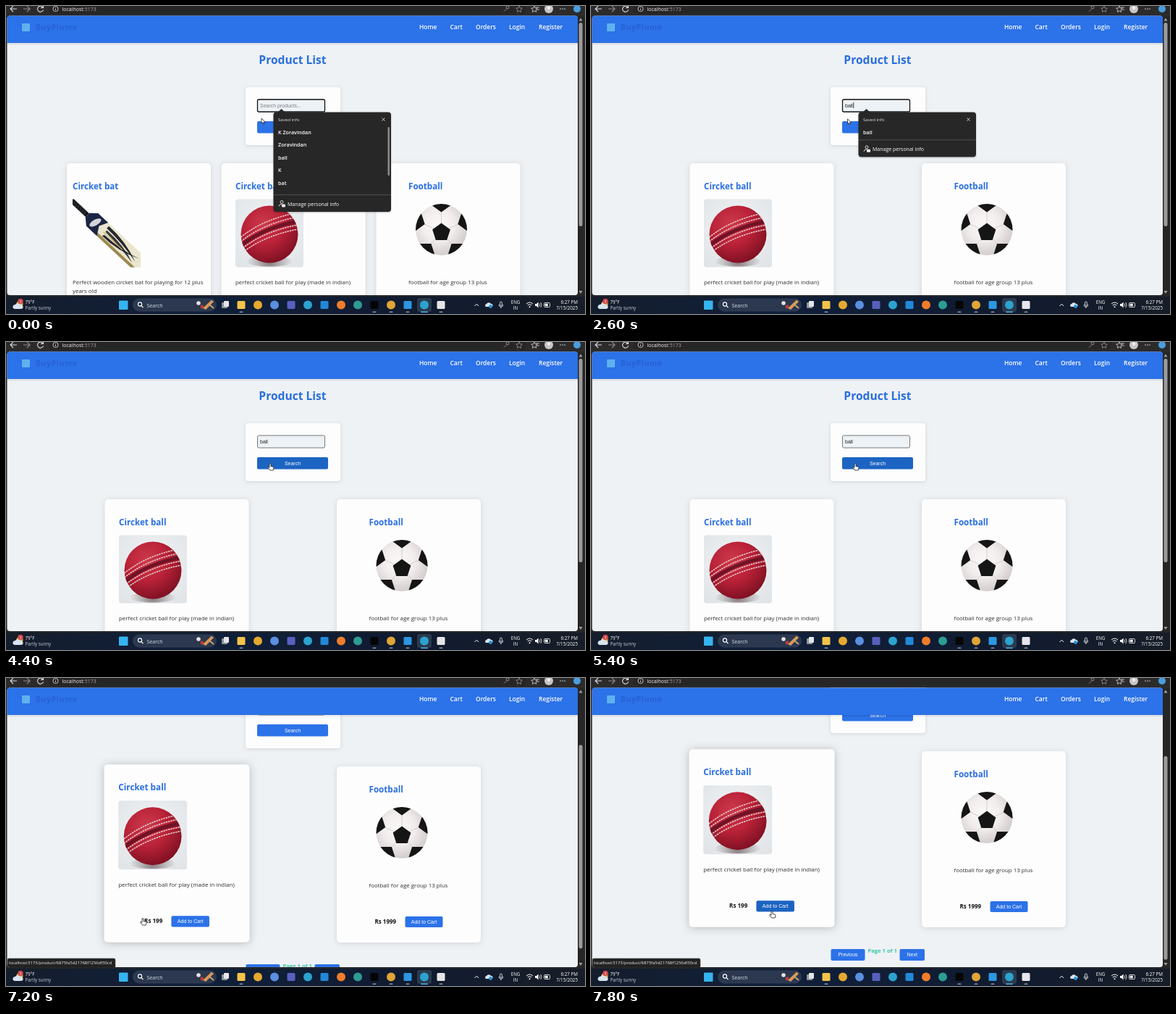
Animation of 800 by 425 pixels, one loop 8 s. Source, as an HTML page with a canvas:

```html
<!DOCTYPE html>
<html lang="en">
<head>
<meta charset="utf-8">
<title>Product search</title>
<style>
  html, body { margin: 0; width: 100%; height: 100%; overflow: hidden; background: #262626; }
  canvas { display: block; width: 100vw; height: 100vh; }
</style>
</head>
<body>
<canvas id="stage" width="800" height="425"></canvas>
<script>
const ctx = document.getElementById('stage').getContext('2d');
const LOOP = 8000, STEP = 200;
const BLUE = '#2c72e8', DARK_BLUE = '#1c64c2', INK = '#262626';
const UI = '"Open Sans", "Noto Sans", sans-serif';
const FORM = '"Liberation Sans", sans-serif';

// ---- drawing helpers ----
function text(str, x, y, size, color, { weight = 400, font = UI, align = 'left', spacing = 0 } = {}) {
  ctx.font = `${weight} ${size}px ${font}`;
  ctx.textAlign = align;
  ctx.letterSpacing = spacing + 'px';
  ctx.fillStyle = color;
  ctx.fillText(str, x, y);
}
function box(x, y, w, h, r, fill, stroke, line = 1) {
  ctx.beginPath();
  ctx.roundRect(x, y, w, h, r);
  if (fill) { ctx.fillStyle = fill; ctx.fill(); }
  if (stroke) { ctx.strokeStyle = stroke; ctx.lineWidth = line; ctx.stroke(); }
}
function circle(x, y, r, fill, stroke, line = 1) {
  box(x - r, y - r, 2 * r, 2 * r, r, fill, stroke, line);
}
function ellipse(x, y, rx, ry, turn, fill) {
  ctx.beginPath();
  ctx.ellipse(x, y, rx, ry, turn, 0, 2 * Math.PI);
  ctx.fillStyle = fill;
  ctx.fill();
}
function path(d, fill, stroke, line = 1) {
  const p = new Path2D(d);
  if (fill) { ctx.fillStyle = fill; ctx.fill(p); }
  if (stroke) { ctx.strokeStyle = stroke; ctx.lineWidth = line; ctx.stroke(p); }
}
function at(x, y, draw) {
  ctx.save();
  ctx.translate(x, y);
  draw();
  ctx.restore();
}
function shadowed(blur, color, draw) {
  ctx.save();
  ctx.shadowBlur = blur;
  ctx.shadowColor = color;
  ctx.shadowOffsetY = 1;
  draw();
  ctx.restore();
}
function radial(x, y, r, ...colors) {
  const g = ctx.createRadialGradient(x, y, 0, x, y, r);
  colors.forEach((c, i) => g.addColorStop(i / (colors.length - 1), c));
  return g;
}
function button(label, x, y, w, h, hot) {
  box(x, y, w, h, 2, hot ? DARK_BLUE : BLUE);
  text(label, x + w / 2, y + h / 2 + 2.4, 7, '#fff', { font: FORM, align: 'center' });
}

// ---- timeline ----
function track(t, keys) {
  let [t0, v0] = keys[0];
  for (const [t1, v1] of keys) {
    if (t < t1) return t <= t0 ? v0 : v0 + (v1 - v0) * (t - t0) / (t1 - t0);
    [t0, v0] = [t1, v1];
  }
  return v0;
}
const inside = (p, x, y, w, h) => p.x > x && p.x < x + w && p.y > y && p.y < y + h;

function stateAt(t) {
  const s = {
    typed: 'ball'.slice(0, [800, 1200, 1600, 2000].filter(k => t >= k).length),
    filtered: t >= 2000,
    focused: t < 4000,
    scroll: track(t, [[6600, 0], [6800, 20], [7200, 95], [7400, 110], [7600, 116]]),
    status: t >= 6600,
    mouse: {
      x: track(t, [[0, 353], [3400, 355], [4000, 365], [5400, 365], [6200, 189], [7400, 189], [7800, 250]]),
      y: track(t, [[0, 155], [3400, 156], [4000, 168], [5400, 168], [6200, 332], [7400, 332], [7800, 322]]),
    },
  };
  s.onSearch = inside(s.mouse, 347, 159 - s.scroll, 98, 16) && !s.focused;
  s.onCard = s.filtered && inside(s.mouse, 136, 217 - s.scroll, 200, 243);
  s.onAdd = s.onCard && inside(s.mouse, 228, 424 - s.scroll, 52, 15);
  return s;
}

// ---- product pictures, each 94 by 94 ----
function drawBat() {
  ctx.beginPath();
  ctx.rect(0, 0, 94, 94);
  ctx.clip();
  ctx.translate(0, 3);
  ctx.rotate(0.75);
  box(-8, -3.5, 40, 7, 2, '#17181d');
  for (let x = 2; x < 26; x += 4) path(`M${x} -3 l2 6`, null, '#4a4b52', 0.7);
  path('M28 -4 L37 -12 H122 Q131 -9 131 0 Q131 9 124 12 H37 L28 4Z', '#eae5cd');
  path('M50 8 H128 L124 12 H46Z', '#9c8850');
  path('M28 -4 L37 -12 H56 L50 0 L57 12 H37 L28 4Z', '#1d2544');
  ellipse(43, 0, 4, 9, 0.3, '#d3d5da');
  path('M60 -9 Q90 -10 120 2 Q88 -5 60 -5Z', '#24262e');
  path('M62 -3 Q94 -4 118 6 Q90 1 62 0Z', '#3a3a3a');
  path('M62 7 Q92 8 122 -5 Q96 4 64 4Z', '#24262e');
  path('M60 2 H96', null, '#c9b26b', 1.2);
}

function drawCricketBall() {
  box(0, 0, 94, 94, 4, radial(47, 40, 70, '#f1f3f4', '#e9ecee', '#dfe3e6'));
  ellipse(47, 86, 32, 7, 0, radial(47, 86, 32, '#85777b', '#b9b5b7', '#e3e6e8'));
  ctx.translate(47, 48.5);
  circle(0, 0, 39.5, radial(-8, -14, 56, '#cc3a4c', '#ba2238', '#7d1022'));
  ctx.beginPath();
  ctx.arc(0, 0, 39.5, 0, 7);
  ctx.clip();
  path('M-42 18 Q-10 -9 40 -18', null, '#701325', 5);
  ctx.setLineDash([2.4, 1]);
  for (const dy of [-12, -6, 5, 11])
    path(`M-42 ${18 + dy} Q-10 ${-9 + dy} 40 ${-18 + dy}`, null, '#ecd3d2', 1.5);
  ctx.setLineDash([]);
}

function drawFootball() {
  ctx.translate(45.5, 42);
  circle(0, 0, 35.5, radial(-4, -6, 44, '#fbf9f8', '#f1edec', '#cfc9c8'));
  ctx.beginPath();
  ctx.arc(0, 0, 35.5, 0, 7);
  ctx.clip();
  const pentagon = (x, y, r, turn) => {
    ctx.beginPath();
    for (let i = 0; i < 5; i++) {
      const a = turn + i * Math.PI * 0.4;
      ctx.lineTo(x + r * Math.cos(a), y + r * Math.sin(a));
    }
    ctx.closePath();
    ctx.fillStyle = '#151515';
    ctx.fill();
  };
  for (let i = 0; i < 5; i++) {
    const a = -Math.PI / 2 + i * Math.PI * 0.4, c = Math.cos(a), s = Math.sin(a);
    path(`M0 3 L${26 * c} ${26 * s}`, null, '#cdc8c7', 0.8);
    pentagon(37 * c, 37 * s, 13, a + Math.PI);
  }
  pentagon(0, 4, 13, -Math.PI / 2);
}

// ---- page ----
const BAT = { title: 'Circket bat', inset: 8, draw: drawBat,
  lines: ['Perfect wooden circket bat for playing for 12 plus', 'years old'] };
const BALL = { title: 'Circket ball', inset: 19.5, draw: drawCricketBall,
  lines: ['perfect cricket ball for play (made in indian)'], price: 'Rs 199', priceX: 55, addX: 92 };
const FOOTBALL = { title: 'Football', inset: 44.5, draw: drawFootball,
  lines: ['football for age group 13 plus'], price: 'Rs 1999', priceX: 52.5, addX: 94.5 };

function card(product, x, raised, addHot) {
  at(x, 217, () => {
    if (raised) {
      ctx.translate(99.5, 120);
      ctx.scale(1.01, 1.01);
      ctx.translate(-99.5, -121.5);
    }
    shadowed(raised ? 12 : 7, `rgba(0,0,0,${raised ? 0.24 : 0.13})`, () => box(0, 0, 199, 243, 5, '#fdfdfd'));
    const { inset, title, draw, lines, price, priceX, addX } = product;
    text(title, inset, 35.5, 11.65, '#2a6fdf', { weight: 700 });
    at(inset, 49.5, draw);
    lines.forEach((line, i) => text(line, inset, 167 + i * 11.5, 7.92, '#303030'));
    if (price) {
      text(price, priceX, 217, 8, '#161616', { weight: 700 });
      button('Add to Cart', addX, 207, 52, 15, addHot);
    }
  });
}

function searchPanel(s) {
  shadowed(5, 'rgba(0,0,0,.12)', () => box(331, 112, 131, 80, 4, '#fdfdfd'));
  box(347.5, 129, 93, 17, 2, '#edf2f6', s.focused ? '#111' : '#777', s.focused ? 1.3 : 1);
  text(s.typed || 'Search products...', 351, 140, 7, s.typed ? '#222' : '#7a7f85', { font: FORM });
  if (s.focused && s.typed) {
    ctx.fillStyle = '#111';
    ctx.fillRect(351.5 + ctx.measureText(s.typed).width, 133, 0.8, 8);
  }
  button('Search', 347, 159, 98, 16.5, s.onSearch);
}

function navBar() {
  shadowed(3, 'rgba(0,0,0,.15)', () => box(0, 13, 792, 38, 0, BLUE));
  box(22, 24, 11, 11, 1, '#5fb0ee');
  text('BuyPlume', 41, 33, 10, '#2760d4', { weight: 700, spacing: 0.9 });
  const links = { Home: 571, Cart: 613.5, Orders: 649, Login: 695, Register: 736 };
  for (const label in links) text(label, links[label], 32, 8.45, '#fff', { weight: 600 });
}

function savedInfo(s) {
  const all = ['K Zoravindan', 'Zoravindan', 'ball', 'K', 'bat'];
  const items = !s.typed ? all : s.filtered ? ['ball'] : ['ball', 'bat'];
  const rule = items.length > 2 ? 260.5 : 167.2 + items.length * 17.6;
  shadowed(2, 'rgba(0,0,0,.25)', () => {
    path('M375 147 L380.5 142 L386 147Z', '#272727');
    box(369.5, 146.5, 162.5, rule + 23.5 - 146.5, 4, '#272727');
  });
  text('Saved info', 376, 159, 6.1, '#e4e4e4');
  path('M519.5 154.5 l4 4 m0 -4 l-4 4', null, '#e6e6e6', 0.9);
  items.forEach((item, i) => text(item, 376, 176.5 + i * 17.6, 7.2, '#fff', { weight: 600 }));
  if (items.length > 2) box(527.5, 167, 2.5, 67, 1.2, '#8b8b8b');
  path(`M370 ${rule} H532`, null, '#5a5a5a', 0.8);
  at(381, rule + 12, () => {
    circle(0, -2, 2, null, '#eee', 0.9);
    path('M-4 4 Q-4 1 0 1', null, '#eee', 0.9);
    box(0, 1, 5, 4, 1, '#eee');
  });
  text('Manage personal info', 389, rule + 15, 7, '#fff');
}

function page(s) {
  ctx.save();
  ctx.beginPath();
  ctx.roundRect(1.5, 13.5, 788.5, 385.5, 4);
  ctx.clip();
  ctx.fillStyle = '#eef2f5';
  ctx.fillRect(0, 13, 792, 390);
  at(0, -s.scroll, () => {
    text('Product List', 396, 80, 15.6, '#2a6fdf', { weight: 700, align: 'center' });
    searchPanel(s);
    if (s.filtered) {
      card(BALL, 136.5, s.onCard, s.onAdd);
      card(FOOTBALL, 457, false);
    } else {
      card(BAT, 84, false);
      card(BALL, 297.5, false);
      card(FOOTBALL, 511.5, false);
    }
    button('Previous', 331.5, 490, 47, 16);
    text('Page 1 of 1', 382.5, 494.5, 7.6, '#38c5a8', { weight: 700 });
    button('Next', 426.5, 490, 34.5, 16);
  });
  navBar();
  if (s.focused) savedInfo(s);
  if (s.status) {
    box(2, 387, 149, 13, 2, '#222', '#444', 0.6);
    text('localhost:5173/product/6875fa5d21768f1256df30cd', 4, 395, 5.9, '#f2f2f2');
  }
  ctx.restore();
  path('M791.5 20.5 l2.5 -4 l2.5 4Z M791.5 393 l2.5 4 l2.5 -4Z', '#a0a0a0');
  box(791.5, 23 + s.scroll * 0.73, 5, 281, 2.5, '#9c9c9c');
}

// ---- browser and desktop ----
function toolbar() {
  ctx.fillStyle = '#2b2b2b';
  ctx.fillRect(0, 0, 800, 14);
  box(59, -8, 660, 19, 6, '#262626');
  path('M15 4 H6 M10 0 L6 4 L10 8', null, '#ddd', 1.1);
  path('M24 4 H33 M29 0 L33 4 L29 8', null, '#8c8c8c', 1.1);
  path('M51 2 A4 4 0 1 0 51.5 5 M51.5 -1 V2.5 H48', null, '#ddd', 1.1);
  circle(68.5, 4, 3.6, null, '#ccc', 0.9);
  path('M68.5 3.5 V6 M68.5 1.8 V2.5', null, '#ccc', 0.9);
  text('localhost', 77.5, 6.5, 7, '#f0f0f0');
  text(':5173', 77.5 + ctx.measureText('localhost').width, 6.5, 7, '#a5a5a5');
  circle(693, 2, 2, null, '#888');
  path('M691.5 4 L688 7.5', null, '#888');
  const star = 'l1.3 2.8 3 .4 -2.2 2.1 .6 3 -2.7 -1.5 -2.7 1.5 .6 -3 -2.2 -2.1 3 -.4Z';
  path('M709 0 ' + star, null, '#999', 0.8);
  path('M730 0 ' + star + ' M732 2 h5 M733 5 h4', null, '#ddd', 0.8);
  circle(750, 4, 6, '#c9c6c4');
  circle(750, 2.5, 2.2, '#f0efee');
  for (const x of [766, 769, 772]) circle(x, 4, 0.8, '#ddd');
  circle(789, 4, 5, '#4a9ee0');
}

function taskbar() {
  const shade = ctx.createLinearGradient(0, 0, 800, 0);
  ['#141d2c', '#10203a', '#101b31', '#171d28'].forEach((c, i) => shade.addColorStop(i / 3, c));
  ctx.fillStyle = shade;
  ctx.fillRect(0, 401, 800, 24);

  circle(19, 411, 4.5, '#f5b83a');
  path('M12 418 a3 3 0 0 1 1 -6 a4 4 0 0 1 7 0 a3 3 0 0 1 1 6Z', '#d8e4f0');
  circle(20, 407.5, 3.8, '#d1434a');
  text('3', 20, 409.5, 5, '#fff', { align: 'center' });
  text('79°F', 26.5, 410.5, 6.2, '#fff');
  text('Partly sunny', 26.5, 419, 6.2, '#c9d0d8');

  box(156, 406.5, 12.5, 12.5, 1, '#37b4ef');
  box(175.5, 404, 115, 17, 8.5, '#2b3850', '#3a475d', 0.6);
  circle(185, 411.5, 2.6, null, '#fff', 1.1);
  path('M187 413.5 l2.5 2.5', null, '#fff', 1.1);
  text('Search', 194.5, 415.5, 7, '#d9e0e7');
  circle(266, 410, 2.8, '#e6e2df');
  circle(271, 415, 2.4, '#c63b3b');
  path('M272 417 L284 405.5 L287 408 L276 419Z', '#d59a58');
  path('M281 412 L287 417', null, '#c8a06a', 2);

  box(568, 403, 20, 19, 3, '#2b3a4d');
  box(298, 409, 8, 8, 1, '#8c949c');
  box(301, 407, 7, 8, 1, '#e4e6e8');
  const square = (x, color) => box(x - 5.5, 407, 11, 11, 1.5, color);
  const disc = (x, color) => circle(x, 412.5, 6, color);
  square(325, '#f3c34b');
  disc(348, '#e6a92f');
  disc(371, '#5b8fe0');
  square(394, '#5860bd');
  disc(417, '#2da3cf');
  square(440, '#2289d8');
  disc(463, '#ef7c2b');
  disc(486, '#2d9c93');
  square(509, '#050505');
  disc(532, '#dfa536');
  square(555, '#2c96e0');
  disc(578, '#2da3cf');
  square(601, '#e7e5e8');
  for (const x of [325, 509, 532, 555, 601]) box(x - 2.5, 421.5, 5, 1.5, 0.7, '#8d98a4');
  box(573, 421.5, 10, 1.5, 0.7, '#4db4ef');

  path('M647.5 414 l2.8 -2.8 l2.8 2.8', null, '#fff', 1);
  path('M663 415 a2.2 2.2 0 0 1 1 -4 a3.4 3.4 0 0 1 6 0 a2 2 0 0 1 1 4Z', '#dbe6ef');
  circle(669.5, 414.5, 2.4, '#2a93dc');
  box(682.5, 408, 2.8, 5.5, 1.4, null, '#fff', 0.8);
  path('M681 412 q0 3.2 2.9 3.2 t2.9 -3.2 M683.9 415 v2', null, '#fff', 0.8);
  text('ENG', 704, 410.5, 6.2, '#fff', { align: 'center' });
  text('IN', 704, 419, 6.2, '#fff', { align: 'center' });
  path('M719 411 q4.5 -4 9 0 M720.7 413 q2.8 -2.5 5.6 0', null, '#fff', 1);
  circle(723.5, 415.2, 1, '#fff');
  path('M731 411 h2 l2.5 -2.5 v8 l-2.5 -2.5 h-2Z', '#fff');
  path('M737 410.5 q1.6 2 0 4 M738.8 409 q2.6 3.5 0 7', null, '#fff', 0.8);
  box(743.5, 409.5, 8, 6, 1.2, null, '#fff', 0.8);
  box(744.7, 410.7, 4, 3.6, 0.5, '#fff');
  text('6:27 PM', 790, 410.5, 6.3, '#fff', { align: 'right' });
  text('7/15/2025', 790, 419, 6.3, '#fff', { align: 'right' });
}

function pointer(s) {
  at(s.mouse.x, s.mouse.y, () => {
    ctx.lineJoin = 'round';
    const shape = s.onSearch || s.onCard
      ? 'M-1 0 q1 -1 2 0 v3.5 l3 .7 q1 .3 1 1.4 l-.8 3.4 h-4.6 l-3 -4 q.2 -1.2 1.4 -.5 l1 .9Z'
      : 'M0 0 V7 L1.7 5.5 L2.9 8.2 L4 7.7 L2.9 5.1 H5Z';
    path(shape, '#fff', '#222', 0.8);
  });
}

function render(now) {
  const s = stateAt(Math.floor((now % LOOP) / STEP) * STEP);
  ctx.fillStyle = INK;
  ctx.fillRect(0, 0, 800, 425);
  toolbar();
  page(s);
  taskbar();
  pointer(s);
}

const start = performance.now();
function tick() {
  render(performance.now() - start);
  requestAnimationFrame(tick);
}
tick();
</script>
</body>
</html>
```
